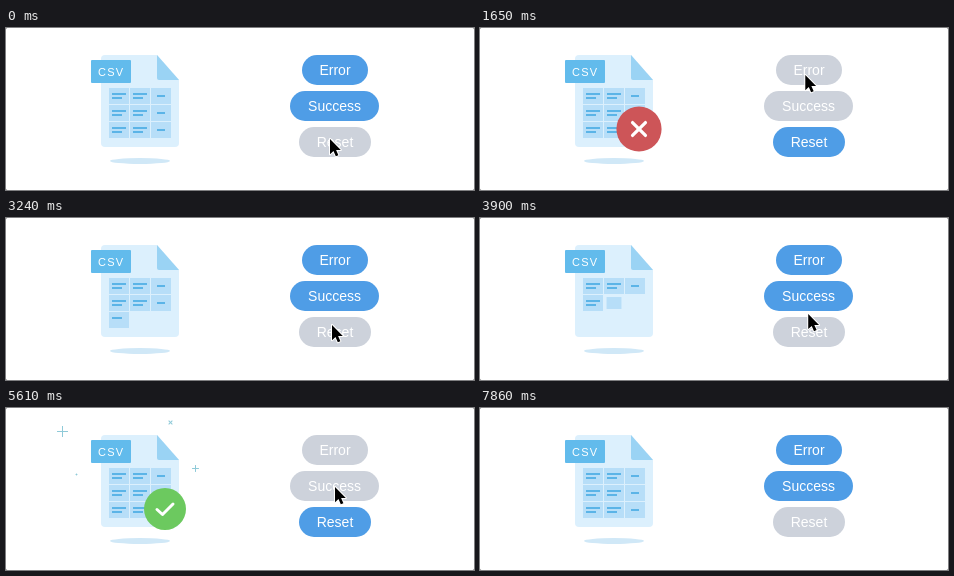
An HTML page with a canvas that plays this animation: 468x162 px, repeating every 7.98 s.

```html
<!DOCTYPE html>
<html lang="en">
<head>
<meta charset="utf-8">
<title>CSV upload states</title>
<style>
  html, body { margin: 0; width: 100%; height: 100%; overflow: hidden; background: #555; }
  canvas { display: block; width: 468px; height: 162px; background: #fff; border-radius: 2px; }
</style>
</head>
<body>
<canvas id="stage"></canvas>
<script>
const W = 468, H = 162, LOOP = 7980;
const canvas = document.getElementById('stage');
const ctx = canvas.getContext('2d');
const ratio = window.devicePixelRatio || 1;
canvas.width = W * ratio;
canvas.height = H * ratio;

const FONT = '"Liberation Sans", Arial, sans-serif';
const TONES = { blue: [79, 157, 230], hover: [101, 187, 238], gray: [205, 210, 219] };

// Clicks that start and clear each result
const RESULTS = [
  { kind: 'error', from: 1450, to: 2595, color: '#cd5558' },
  { kind: 'success', from: 4950, to: 7000, color: '#6cc95f' }
];

const BUTTONS = [
  { label: 'Error', x: 296, y: 27, w: 66, states: [
    [0, 'blue'], [590, 'hover'], [1450, 'gray'], [2595, 'blue'], [4950, 'gray'], [7000, 'blue']] },
  { label: 'Success', x: 284, y: 63, w: 89, states: [
    [0, 'blue'], [380, 'hover'], [550, 'blue'], [1450, 'gray'], [2595, 'blue'],
    [4030, 'hover'], [4950, 'gray'], [7000, 'blue']] },
  { label: 'Reset', x: 293, y: 99, w: 72, states: [
    [0, 'gray'], [1450, 'blue'], [2430, 'hover'], [2595, 'gray'], [4950, 'blue'],
    [6320, 'hover'], [7000, 'gray']] }
];

// Pointer stops: time, x, y
const PATH = [
  [0, 324, 111], [200, 324, 111], [720, 326, 47], [2160, 325, 47], [2520, 326, 107],
  [3600, 326, 107], [4250, 331, 82], [5000, 331, 82], [5500, 329, 79], [5900, 329, 79],
  [6500, 326, 107], [7050, 326, 107], [7310, 408, 84]
];
const POINTER_END = 7320;

const SPARKS = [
  { x: 56, y: 23, r: 5.5, start: 5250, span: 720, turn: 0 },
  { x: 164, y: 14, r: 4, start: 5450, span: 700, turn: Math.PI / 4 },
  { x: 189, y: 60, r: 4, start: 5100, span: 760, turn: 0 },
  { x: 70, y: 66, r: 4, start: 5560, span: 700, turn: 0 }
];

const ARROW = new Path2D('M0 0V15.2L3.5 12L5.8 17.3L8.4 16.2L6.1 11H10.8Z');
const HAND = new Path2D(
  'M-1.5 1Q-.5 -1 1 1L2.5 6Q4 4.6 5 6Q6.6 5 7.6 6.6Q9.5 6 10 8L10.5 11' +
  'Q10.6 13 9.5 15.5H2.5Q1 13 -3.5 10Q-5 8.4 -3.3 7.7Q-2 7.5 .4 9Z');
const KNUCKLES = new Path2D('M3.5 9.5L4.3 13M5.7 9.2L6.4 13M7.8 9L8.3 12.6');

const clamp = v => Math.max(0, Math.min(1, v));
const mix = (a, b, p) => a + (b - a) * p;
const smooth = p => p * p * (3 - 2 * p);
const backOut = p => 1 + 2.7 * (p - 1) ** 3 + 1.7 * (p - 1) ** 2;

function fill(path, color) {
  ctx.fillStyle = color;
  ctx.fill(path);
}

function line(points, color, width) {
  ctx.beginPath();
  points.forEach(([x, y]) => ctx.lineTo(x, y));
  ctx.strokeStyle = color;
  ctx.lineWidth = width;
  ctx.stroke();
}

function box(x, y, w, h, r) {
  const p = new Path2D();
  p.roundRect(x, y, w, h, r);
  return p;
}

function stateIndex(b, t) {
  let i = 0;
  while (i + 1 < b.states.length && b.states[i + 1][0] <= t) i++;
  return i;
}

// Table fill, counted in cells
const STEP = 75, CYCLE = 1388, HOLD = 900;

function idleFill(ms) {
  const p = ms % CYCLE;
  return p < HOLD ? Math.min(9, p / STEP) : 9 * (1 - (p - HOLD) / (CYCLE - HOLD));
}

function tableFill(t) {
  let start = -788;
  for (const { from, to } of RESULTS) {
    if (t < from) break;
    if (t < to) return mix(idleFill(from - start), 9, clamp((t - from) / 120));
    start = to + 150;
  }
  return t < start ? 9 * (start - t) / 150 : idleFill(t - start);
}

function drawCell(k, u) {
  const col = k % 3, x = 103 + col * 21, y = 60 + Math.floor(k / 3) * 17;
  const s = clamp(u / 0.35) ** 1.3;
  if (s <= 0) return;
  ctx.fillStyle = '#b7def8';
  ctx.fillRect(x + 10 * (1 - s), y + 8 * (1 - s), 20 * s, 16 * s);
  const a = clamp((u - 0.4) / 0.3), b = clamp((u - 0.65) / 0.35);
  ctx.fillStyle = '#5bb4e7';
  if (col === 2) {
    ctx.fillRect(x + 6, y + 7, 8 * a, 2);
  } else {
    ctx.fillRect(x + 3, y + 5, 14 * a, 2);
    ctx.fillRect(x + 3, y + 9, 10 * b, 2);
  }
}

function drawDocument(t) {
  ctx.beginPath();
  ctx.ellipse(134, 133, 30, 3, 0, 0, 7);
  ctx.fillStyle = '#d0e8f7';
  ctx.fill();
  fill(new Path2D('M99 27H151L173 52V115Q173 119 169 119H99Q95 119 95 115V31Q95 27 99 27Z'), '#dcf0fd');
  fill(new Path2D('M151 27L173 52H153Q151 52 151 50Z'), '#9ad3f4');
  fill(box(85, 32, 40, 23, 1), '#62bbec');
  ctx.fillStyle = '#fff';
  ctx.font = '11px ' + FONT;
  ctx.textAlign = 'left';
  ctx.letterSpacing = '1.2px';
  ctx.fillText('CSV', 92, 47.5);
  ctx.letterSpacing = '0px';
  const v = tableFill(t);
  for (let k = 0; k < 9; k++) drawCell(k, v - k);
}

function drawResult(t) {
  for (const { kind, from, to, color } of RESULTS) {
    const show = clamp((t - from - 60) / 300), hide = clamp((t - to) / 160);
    const s = show > 0 ? backOut(show) * (1 - smooth(hide)) : 0;
    if (s <= 0.001) continue;
    ctx.save();
    ctx.translate(159, 101);
    ctx.scale(s, s);
    ctx.beginPath();
    ctx.arc(0, 0, 21, 0, 7);
    ctx.fillStyle = color;
    ctx.fill();
    ctx.lineCap = ctx.lineJoin = 'round';
    if (kind === 'error') {
      line([[-6, -6], [6, 6]], '#fff', 3);
      line([[6, -6], [-6, 6]], '#fff', 3);
    } else {
      const p = clamp((t - from - 180) / 260);
      const a = clamp(p / 0.35), b = clamp((p - 0.35) / 0.65);
      if (p > 0) {
        const mid = [mix(-8, -2.5, a), mix(0.5, 5.5, a)];
        line([[-8, 0.5], mid, [mix(mid[0], 8, b), mix(mid[1], -5, b)]], '#fff', 3);
      }
    }
    ctx.restore();
  }
}

function drawSparks(t) {
  for (const s of SPARKS) {
    const p = (t - s.start) / s.span;
    if (p <= 0 || p >= 1) continue;
    const r = s.r * Math.sin(Math.PI * p);
    ctx.save();
    ctx.translate(s.x + 0.5, s.y + 0.5);
    ctx.rotate(s.turn);
    line([[-r, 0], [r, 0]], '#8fcad8', 1);
    line([[0, -r], [0, r]], '#8fcad8', 1);
    ctx.restore();
  }
}

function drawButton(b, t) {
  const i = stateIndex(b, t), [since, name] = b.states[i];
  const before = TONES[b.states[Math.max(0, i - 1)][1]];
  const p = clamp((t - since) / 120);
  const rgb = TONES[name].map((c, n) => Math.round(mix(before[n], c, p)));
  fill(box(b.x, b.y, b.w, 30, 15), `rgb(${rgb})`);
  ctx.fillStyle = '#fff';
  ctx.font = '14px ' + FONT;
  ctx.textAlign = 'center';
  ctx.fillText(b.label, b.x + b.w / 2, b.y + 20);
}

function drawPointer(t) {
  if (t >= POINTER_END) return;
  let i = 0;
  while (i < PATH.length - 2 && PATH[i + 1][0] <= t) i++;
  const [t0, x0, y0] = PATH[i], [t1, x1, y1] = PATH[i + 1];
  const p = smooth(clamp((t - t0) / (t1 - t0)));
  const hand = BUTTONS.some(b => b.states[stateIndex(b, t)][1] === 'hover');
  ctx.save();
  ctx.translate(mix(x0, x1, p), mix(y0, y1, p));
  ctx.lineJoin = 'round';
  if (hand) {
    ctx.strokeStyle = '#000';
    ctx.lineWidth = 1.8;
    ctx.stroke(HAND);
    fill(HAND, '#fff');
    ctx.lineWidth = 0.8;
    ctx.stroke(KNUCKLES);
  } else {
    ctx.strokeStyle = '#fff';
    ctx.lineWidth = 2;
    ctx.stroke(ARROW);
    fill(ARROW, '#000');
  }
  ctx.restore();
}

function draw(t) {
  ctx.setTransform(ratio, 0, 0, ratio, 0, 0);
  ctx.fillStyle = '#fff';
  ctx.fillRect(0, 0, W, H);
  drawDocument(t);
  drawSparks(t);
  drawResult(t);
  BUTTONS.forEach(b => drawButton(b, t));
  drawPointer(t);
}

const begin = performance.now();
function frame() {
  draw((performance.now() - begin) % LOOP);
  requestAnimationFrame(frame);
}
frame();
</script>
</body>
</html>
```
